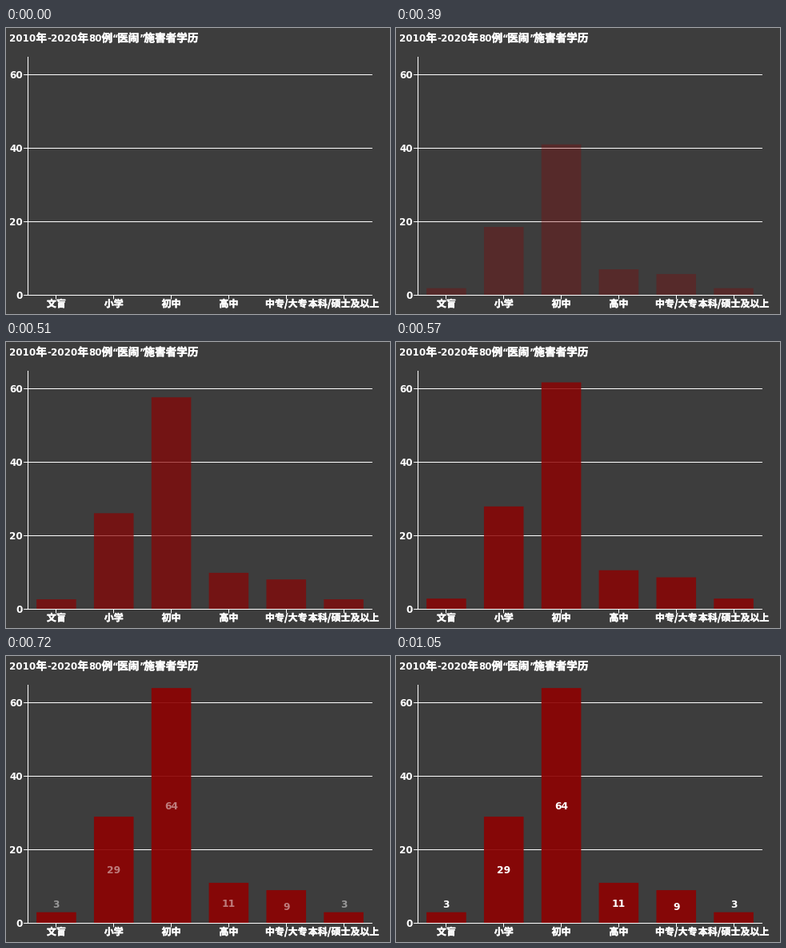
Write a matplotlib script that moves like this. It is 480 px wide and 358 px high and loops after 3.36 s.

```python
import math

import matplotlib.pyplot as plt
from matplotlib.animation import FuncAnimation
from matplotlib.patches import Rectangle
from matplotlib.patheffects import withStroke

W, H, DPI = 480, 358, 100
STEP, FRAMES = 30, 112
BG, RED, WHITE = "#3d3d3d", "#8c0303", "#ffffff"
HAN, LATIN = "Noto Sans CJK JP", "DejaVu Sans"

LEFT, RIGHT, TOP, BASE = 27, 458, 36, 334.5
UNIT = 4.6
BAR_W = 49.6
SLOT = (RIGHT - LEFT) / 6
NAMES = ["文盲", "小学", "初中", "高中", "中专/大专", "本科/硕士及以上"]
VALUES = [3, 29, 64, 11, 9, 3]

fig = plt.figure(figsize=(W / DPI, H / DPI), dpi=DPI, facecolor=BG)
ax = fig.add_axes([0, 0, 1, 1])
ax.set_xlim(0, W)
ax.set_ylim(H, 0)
ax.axis("off")


def px(size):
    return size * 72 / DPI


def label(x, y, text, size, ha="center", font=LATIN, **kw):
    return ax.text(x, y, text, fontsize=px(size), family=font, weight="bold",
                   color=WHITE, ha=ha, va="baseline", **kw)


def han(x, y, text, size, ha="center"):
    heavy = [withStroke(linewidth=px(0.45), foreground=WHITE)]
    return label(x, y, text, size, ha, HAN, path_effects=heavy)


def line(xs, ys, z=1):
    ax.plot(xs, ys, color=WHITE, lw=px(1), solid_capstyle="butt",
            snap=False, zorder=z)


def clamp(t):
    return min(max(t, 0), 1)


def ease_out(t, power):
    return 1 - (1 - clamp(t)) ** power


def ease_in_out(t):
    return (1 - math.cos(math.pi * clamp(t))) / 2


# Title: wide Latin pieces between the Han pieces
for x, part in [(4.2, "2010"), (51.2, "-"), (56.3, "2020"), (103, "80"),
                (133, "“"), (166.6, "”")]:
    label(x, 16.6, part, 11.9, "left")
for x, part in [(37.4, "年"), (89.4, "年"), (119.5, "例"),
                (139.2, "医闹"), (172.4, "施害者学历")]:
    han(x, 17.2, part, 13.6, "left")

for value in (0, 20, 40, 60):
    y = BASE - value * UNIT
    line([22, RIGHT], [y, y], 3 if value == 0 else 1)
    label(20.9, y + 4.6, str(value), 12, "right")
line([LEFT + 0.5] * 2, [TOP, BASE])

bars, numbers = [], []
for i, (name, value) in enumerate(zip(NAMES, VALUES)):
    x = LEFT + SLOT * (i + 0.5)
    line([int(x) + 0.5] * 2, [BASE, BASE + 5])
    han(x, 349.2, name, 12)
    bar = Rectangle((x - BAR_W / 2, BASE), BAR_W, 0, color=RED, lw=0,
                    snap=False, zorder=2)
    bars.append(ax.add_patch(bar))
    height = value * UNIT
    mid = BASE - height / 2 if value > 5 else BASE - height - 10.5
    numbers.append(label(x, mid + 4.6, str(value), 12.3, zorder=4))


def draw(frame):
    ms = frame * STEP
    t = 0.136 + (ms - 300) / STEP * 0.0668 if ms >= 300 else 0
    grow = ease_out(t, 2.5)
    fade = 0.92 * ease_in_out(t + 0.065) if t else 0
    shown = ease_out((ms - 620) / 430, 2.5)
    shown = shown * shown * (3 - 2 * shown)
    for bar, number, value in zip(bars, numbers, VALUES):
        height = value * UNIT * grow
        bar.set_y(BASE - height)
        bar.set_height(height)
        bar.set_alpha(fade)
        number.set_alpha(shown)
    return bars + numbers


anim = FuncAnimation(fig, draw, frames=FRAMES, interval=STEP, repeat=True,
                     repeat_delay=0, init_func=lambda: draw(0))
plt.show()
```
